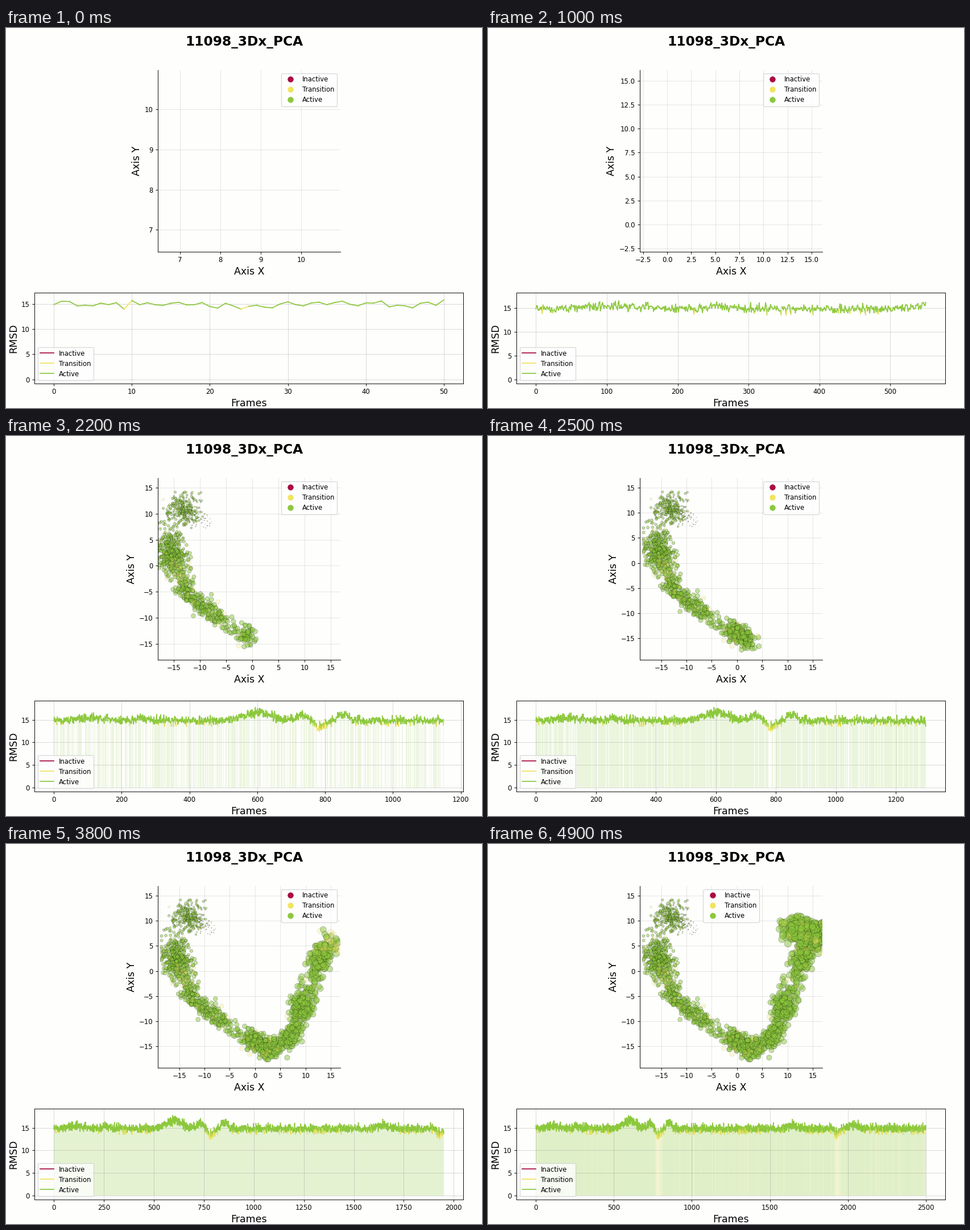
A matplotlib script that plays this animation: 837x669 px, repeating every 5000 ms.

```python
import numpy as np
import matplotlib.pyplot as plt
from matplotlib.animation import FuncAnimation
from matplotlib.collections import LineCollection, PolyCollection
from matplotlib.colors import to_rgba
from matplotlib.lines import Line2D

WIDTH, HEIGHT = 837, 669
STEPS, PER_STEP = 50, 50
TOTAL = STEPS * PER_STEP
COLUMNS = 686
PAPER = "#fefefd"
STATES = {"Inactive": "#a90c43", "Transition": "#f1e460", "Active": "#8cc83c"}
YELLOW, GREEN = (np.array(to_rgba(STATES[s])) for s in ("Transition", "Active"))

plt.rcParams["font.family"] = "DejaVu Sans"
rng = np.random.default_rng(11)
index = np.arange(TOTAL + 1)


def rmsd_top(i):
    """Highest RMSD reached by index i."""
    return np.interp(i, [50, 550, 600], [16.4, 17.4, 18.35])


def path_low(i):
    """Lowest height the path has reached by index i."""
    return np.interp(i, [50, 350, 480, 720, 850, 1150, 1300],
                     [6.66, 6.3, -1.98, -1.98, -4.8, -16.5, -17.6])


def path_high(i):
    return np.interp(i, [50, 200], [10.77, 15.26])


def make_rmsd():
    """Noise around a level with a few bumps (centre, width, height)."""
    bumps = [(110, 70, 0.6), (260, 30, 0.5), (600, 60, 1.8), (735, 22, 1.3),
             (785, 20, -1.4), (855, 18, 1.5), (1650, 40, 0.8),
             (1935, 24, -1.2), (2040, 40, 0.9)]
    values = 14.8 + rng.normal(0, 0.5, TOTAL + 1).clip(-1.2, 1.3)
    for centre, width, height in bumps:
        values += height * np.exp(-((index - centre) / width) ** 2)
    return values.clip(12, rmsd_top(index))


def make_path():
    """Scatter positions along waypoints (index, x, y) with seeded noise."""
    way = np.array([
        (0, -8.6, 8.1), (60, -12.5, 10.5), (330, -13.8, 10.8), (420, -16.4, 3.5),
        (740, -14.8, 0.8), (880, -12.5, -5.5), (1050, -6.5, -10), (1100, -1.5, -13.2),
        (1320, 2.8, -15.8), (1460, 7.3, -13.2), (1560, 9.2, -7.5), (1700, 9.4, -6.5),
        (1770, 12.2, 0.5), (1950, 14.8, 6), (2200, 15.5, 8), (2500, 10.5, 8.2)])
    spread = np.interp(index, [0, 60, 700, 900, TOTAL], [0.8, 1.5, 1.4, 0.9, 1.2])
    noise = rng.normal(0, 1, (2, TOTAL + 1)).clip(-2.3, 2.3) * spread
    x = np.interp(index, way[:, 0], way[:, 1]) + noise[0]
    y = np.interp(index, way[:, 0], way[:, 2]) + noise[1]
    return np.column_stack([x.clip(-18.5), y.clip(path_low(index), path_high(index))])


def state_colors(active_alpha=1.0, transition_alpha=1.0):
    colors = np.where(is_transition[:, None], YELLOW, GREEN)
    colors[:, 3] = np.where(is_transition, transition_alpha, active_alpha)
    return colors


def add_axes(left, top, right, bottom, grid_alpha):
    ax = fig.add_axes([left / WIDTH, 1 - bottom / HEIGHT,
                       (right - left) / WIDTH, (bottom - top) / HEIGHT],
                      facecolor=PAPER)
    ax.grid(color="gray", alpha=grid_alpha, linewidth=0.8)
    return ax


def add_legend(ax, loc, **style):
    handles = [Line2D([], [], color=c, label=name, **style) for name, c in STATES.items()]
    return ax.legend(handles=handles, loc=loc, labelspacing=0.43)


def padded(low, high):
    margin = 0.05 * (high - low)
    return low - margin, high + margin


rmsd = make_rmsd()
path = make_path()
is_transition = rmsd < 14
transition_share = np.convolve(is_transition, np.ones(5) / 5, "same")
column_luck = rng.random(COLUMNS)
curve = np.column_stack([index, rmsd])
segments = np.stack([curve[:-1], curve[1:]], axis=1)

fig = plt.figure(figsize=(10.009, 8), dpi=83.625, facecolor=PAPER)
fig.suptitle("11098_3Dx_PCA", fontsize=20, fontweight="bold")

space = add_axes(267, 74, 588, 394, 0.2)
space.spines[["top", "right"]].set_visible(False)
space.set_xlabel("Axis X", fontsize=15)
space.set_ylabel("Axis Y", fontsize=15)
edges = state_colors(0.5, 0.15) * [0, 0, 0, 1]
points = space.scatter(*path.T, s=0.045 * index, c=state_colors(0.5, 0.25),
                       edgecolors=edges, linewidths=0.35)
space_legend = add_legend(space, "upper right", marker="o", linestyle="",
                          markersize=10, markeredgecolor="white")

chart = add_axes(50, 466, 804, 626, 0.3)
chart.set_xlabel("Frames", fontsize=15)
chart.set_ylabel("RMSD", fontsize=15)
area = chart.add_collection(PolyCollection([], linewidths=0, antialiaseds=False),
                            autolim=False)
trace = chart.add_collection(LineCollection([], colors=state_colors(), linewidths=1.5,
                                            capstyle="projecting", zorder=2),
                             autolim=False)
add_legend(chart, "lower left")


def draw_area(step, last):
    """Shade below the curve in columns that fill in over time."""
    left = np.arange(COLUMNS) * last / COLUMNS
    right = left + last / COLUMNS
    at = left.astype(int)
    share = transition_share[at]
    shown = column_luck < (step - 17) / 9
    if step < 34:
        shown &= share < 0.7
    zero, top = np.zeros(COLUMNS), rmsd[at]
    corners = np.stack([np.column_stack([left, left, right, right]),
                        np.column_stack([zero, top, top, zero])], axis=2)
    tint = share[:, None] * (step >= 42)
    colors = GREEN + (YELLOW - GREEN) * tint
    colors[:, 3] = 0.05 + 0.0045 * step
    area.set_verts(corners[shown])
    area.set_facecolor(colors[shown])


def update(step):
    last = PER_STEP * (step + 1)
    # both axes share the limits of the heights, so the path starts off screen
    limits = padded(path_low(last), path_high(last))
    points.set_offsets(path[:last + 1])
    space.set_xlim(limits)
    space.set_ylim(limits)
    space_legend.set_loc("upper center" if step >= 43 else "upper right")

    trace.set_segments(segments[:last])
    draw_area(step, last)
    chart.set_xlim(padded(0, last))
    chart.set_ylim(padded(0, rmsd_top(last)))
    return points, trace, area


anim = FuncAnimation(fig, update, frames=STEPS, interval=100, repeat=True, blit=False)
plt.show()
```
